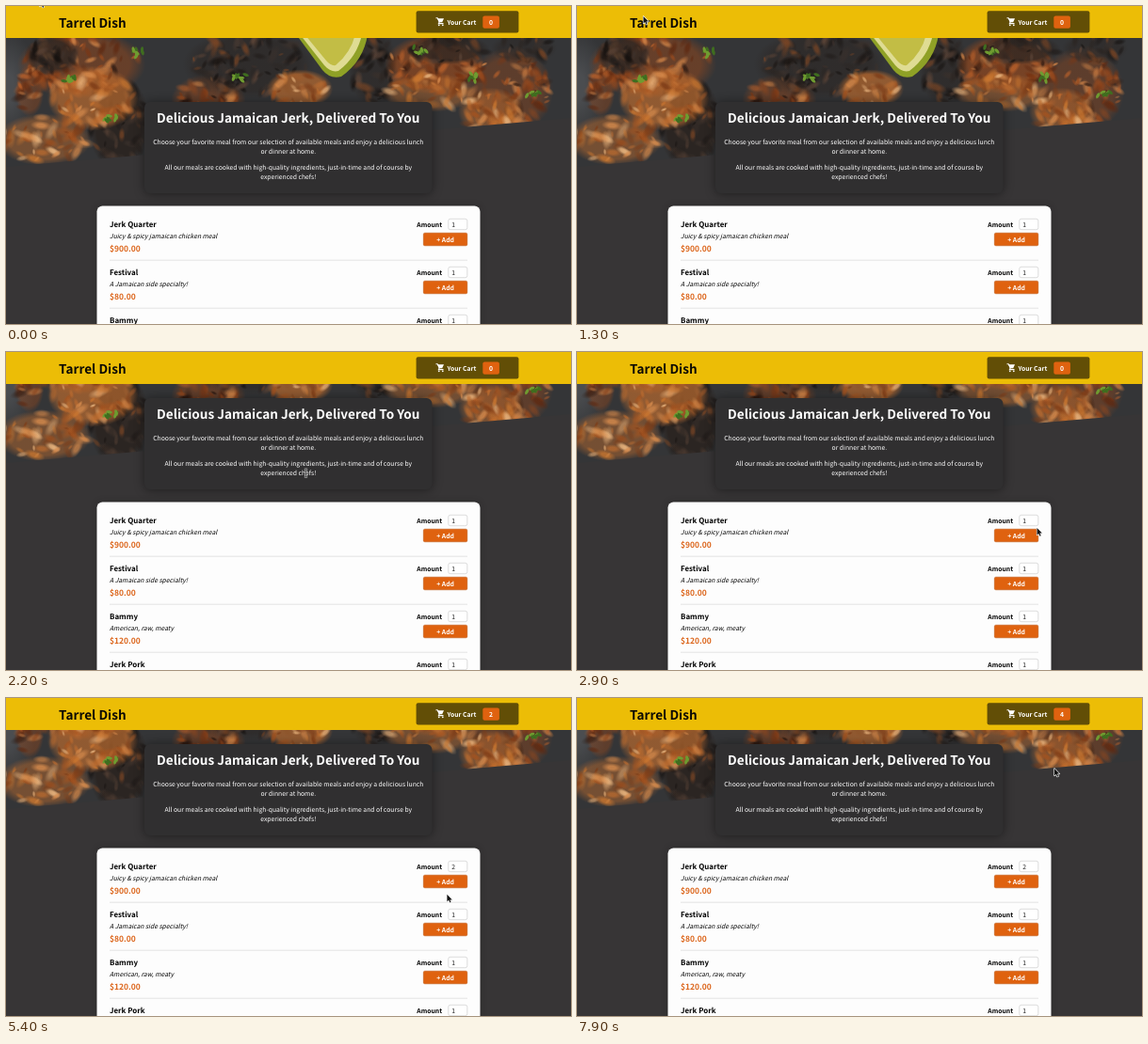
These frames come from a looping animation (600x338 px, 8000 ms). An HTML page with a canvas:

```html
<!DOCTYPE html>
<html lang="en">
<head>
<meta charset="utf-8">
<title>Food order</title>
<style>
html, body { margin: 0; width: 100%; height: 100%; overflow: hidden; background: #373536; }
canvas { display: block; }
</style>
</head>
<body>
<canvas id="stage" width="600" height="338"></canvas>
<script>
const ctx = document.getElementById('stage').getContext('2d');
const FAMILY = '"Noto Sans CJK JP", "Noto Sans CJK SC", "Noto Sans CJK", "Open Sans", sans-serif';
const LOOP = 8000, REM = 6.784, ORANGE = '#df620f', GOLD = '#ecbd06', PAGE = '#373536';

const meals = [
  ['Jerk Quarter', 'Juicy & spicy jamaican chicken meal', '$900.00'],
  ['Festival', 'A Jamaican side specialty!', '$80.00'],
  ['Bammy', 'American, raw, meaty', '$120.00'],
  ['Jerk Pork', '', '']
];
// Clicks on the add buttons: time, cart total afterwards
const clicks = [[4950, 2], [6400, 3], [7200, 4]];
const SPIN_CLICK = 3900;
// Pointer path: time, x, y
const path = [
  [0, 36, -7], [1300, 70.5, 11], [1500, 78, 18], [1900, 198, 125], [2350, 360, 130],
  [2850, 488.5, 187], [3050, 488.5, 187], [3400, 484.5, 176], [4400, 484.5, 176],
  [4800, 468, 195], [5200, 468, 195], [5800, 469.5, 248], [6600, 469.5, 248],
  [7000, 469, 298], [7300, 469, 298], [7800, 507, 75], [LOOP, 507, 75]
];

const clamp = v => Math.max(0, Math.min(1, v));
const smooth = v => { v = clamp(v); return v * v * (3 - 2 * v); };

function track(keys, t, ease = smooth) {
  let i = 1;
  while (i < keys.length - 1 && keys[i][0] < t) i++;
  const a = keys[i - 1], b = keys[i], u = ease((t - a[0]) / (b[0] - a[0]));
  return a.slice(1).map((v, n) => v + (b[n + 1] - v) * u);
}

function box(c, x, y, w, h, r, fill, stroke) {
  c.beginPath();
  c.roundRect(x, y, w, h, r);
  if (fill) { c.fillStyle = fill; c.fill(); }
  if (stroke) { c.strokeStyle = stroke; c.lineWidth = 0.5; c.stroke(); }
}

function text(str, x, y, rem, style, color, align = 'left') {
  const k = REM / 16;
  ctx.save();
  ctx.translate(x, y);
  ctx.scale(k, k);
  ctx.font = `${style} ${rem * 16}px ${FAMILY}`;
  ctx.textRendering = 'geometricPrecision';
  ctx.textAlign = align;
  ctx.fillStyle = color;
  ctx.fillText(str, 0, 0);
  ctx.restore();
}

// Impression of grilled chicken on slate
function makePhoto() {
  const cv = document.createElement('canvas');
  cv.width = 600; cv.height = 180;
  const c = cv.getContext('2d');
  let seed = 11;
  const rnd = () => (seed = seed * 16807 % 2147483647) / 2147483647;
  const blob = (color, x, y, rx, ry, core = 0.6, angle = 0) => {
    c.save();
    c.translate(x, y);
    c.rotate(angle);
    c.scale(rx, ry);
    const g = c.createRadialGradient(0, 0, 0, 0, 0, 1);
    g.addColorStop(0, color);
    g.addColorStop(core, color);
    g.addColorStop(1, color + '00');
    c.fillStyle = g;
    c.fillRect(-1, -1, 2, 2);
    c.restore();
  };
  const shape = (color, d) => { c.fillStyle = color; c.fill(new Path2D(d)); };

  c.fillStyle = '#343537';
  c.fillRect(0, 0, 600, 180);
  blob('#4b4d50', 2, 85, 30, 60, 0.2);

  const char = ['#2b2522', '#14100e', '#3a302b', '#1f1a18', '#5a4336', '#7a4524'];
  const rust = ['#97491d', '#5e2810', '#b9602a', '#2a1710', '#cf8347', '#7a3614'];
  const gold = ['#bd6c2f', '#d98d4e', '#a5531f', '#e6b27c', '#7d3c17', '#c9762f'];
  // Areas of meat: x, y, half width, half height, tones
  const areas = [
    [120, 125, 30, 45, char], [80, 62, 62, 32, rust], [48, 52, 26, 18, char],
    [92, 98, 44, 30, gold], [40, 142, 46, 24, gold], [25, 90, 14, 24, rust],
    [215, 100, 36, 24, rust], [258, 62, 64, 32, char], [312, 88, 32, 18, gold],
    [390, 66, 24, 36, char], [455, 62, 48, 28, rust], [470, 46, 40, 14, char],
    [450, 92, 46, 18, gold], [535, 90, 42, 40, rust], [515, 112, 32, 22, gold],
    [550, 45, 32, 14, char]
  ];
  for (const [x, y, w, h, tones] of areas) {
    blob(tones[0], x, y, w * 1.1, h * 1.15, 0.75);
    for (let i = 0; i < w * h / 22; i++) {
      const a = rnd() * 6.28, d = Math.sqrt(rnd()), size = 2 + rnd() * 6;
      c.globalAlpha = 0.4 + rnd() * 0.4;
      blob(tones[Math.floor(rnd() * 6)], x + Math.cos(a) * d * w, y + Math.sin(a) * d * h,
        size * 1.6, size * 0.7, 0.35, rnd() * 3);
    }
  }
  c.globalAlpha = 1;

  shape('#8fa126', 'M308 30H384Q380 58 356 75Q344 78 336 68Z');
  shape('#dfdc93', 'M312 30H378Q373 54 353 69Q345 71 338 63Z');
  shape('#c2bd45', 'M317 30H371Q366 50 350 63Q345 64 340 58Z');

  // Chopped herbs
  const herbs = [[68, 77], [142, 50], [248, 76], [440, 46], [496, 76], [560, 92], [112, 118]];
  for (const [x, y] of herbs)
    for (let i = 0; i < 8; i++)
      blob(i % 2 ? '#6f9b30' : '#3f6d1f', x + rnd() * 14 - 7, y + rnd() * 8 - 4, 4, 2, 0.6, rnd() * 3);
  return cv;
}
const photo = makePhoto();

function drawPhoto() {
  ctx.save();
  ctx.beginPath();
  ctx.moveTo(0, 0);
  ctx.lineTo(600, 0);
  ctx.lineTo(600, 119);
  ctx.lineTo(0, 171);
  ctx.clip();
  ctx.drawImage(photo, 0, 0);
  ctx.restore();
}

function drawSummary() {
  ctx.save();
  ctx.shadowColor = 'rgba(0,0,0,.45)';
  ctx.shadowBlur = 11;
  ctx.shadowOffsetY = 0.5;
  box(ctx, 147, 102, 305.5, 97, 6, '#302f30');
  ctx.restore();
  const line = (s, y) => text(s, 299.8, y, 1, '400', '#fff', 'center');
  text('Delicious Jamaican Jerk, Delivered To You', 299.8, 124.3, 2, '700', '#fff', 'center');
  line('Choose your favorite meal from our selection of available meals and enjoy a delicious lunch', 147.2);
  line('or dinner at home.', 157.2);
  line('All our meals are cooked with high-quality ingredients, just-in-time and of course by', 173.7);
  line('experienced chefs!', 183.7);
}

function drawMeal([name, info, price], i, t, hovered) {
  const y = 232 + 51 * i, first = i === 0;
  text(name, 110, y + 3.1, 1.17, '700', '#000');
  text(info, 110, y + 14.8, 1, 'italic 400', '#000');
  text(price, 110, y + 28.5, 1.25, '700', '#dc661c');
  text('Amount', 463, y + 2.7, 1, '700', '#000', 'right');

  const focus = first && t >= SPIN_CLICK && t < clicks[0][0];
  box(ctx, 469.8, y - 5.7, 20, 11.4, 2, '#fff', focus ? '#b99a84' : '#bbb');
  text(first && t >= SPIN_CLICK ? '2' : '1', 473.3, y + 2.7, 1, '400', '#222');
  if (focus && (t - SPIN_CLICK) % 1000 < 500) {
    ctx.fillStyle = '#222';
    ctx.fillRect(477.6, y - 4, 0.7, 8);
  }
  if (first && t > 3200 && t < 4560) {
    box(ctx, 482.5, y - 4.5, 6.5, 9, 1, '#d4d1ce');
    ctx.fillStyle = '#555';
    for (const s of [-1, 1]) {
      ctx.beginPath();
      ctx.moveTo(484.3, y + s * 1.3);
      ctx.lineTo(487.3, y + s * 1.3);
      ctx.lineTo(485.8, y + s * 3.2);
      ctx.fill();
    }
  }
  box(ctx, 443.3, y + 9.2, 46.5, 13.6, 1.5, hovered ? '#4f1605' : ORANGE, hovered ? '#4f1605' : '#b9500d');
  text('+ Add', 466.6, y + 18.8, 1, '700', '#fff', 'center');
  ctx.fillStyle = '#cfcfcf';
  ctx.fillRect(110, y + 37.8, 380, 0.6);
}

function drawHeader(t) {
  ctx.fillStyle = GOLD;
  ctx.fillRect(0, 0, 600, 34);
  text('Tarrel Dish', 56, 23, 2, '700', '#0c0a04');

  const last = clicks.filter(c => c[0] <= t).pop() || [-LOOP, 0];
  const bump = [[0, 1], [30, 0.9], [90, 1.1], [150, 1.15], [300, 1]];
  const [scale] = track(bump, t - last[0], clamp);
  ctx.save();
  ctx.translate(490, 16.8);
  ctx.scale(scale, scale);
  ctx.translate(-490, -16.8);
  box(ctx, 435.6, 5.2, 108.8, 23.2, 2, '#624e06');
  ctx.strokeStyle = ctx.fillStyle = '#fff';
  ctx.lineWidth = 1.1;
  ctx.beginPath();
  ctx.moveTo(456.5, 12.7);
  ctx.lineTo(458.2, 12.7);
  ctx.lineTo(460.2, 17);
  ctx.lineTo(459.4, 18.6);
  ctx.lineTo(464.5, 18.6);
  ctx.stroke();
  ctx.beginPath();
  ctx.moveTo(458.3, 13.3);
  ctx.lineTo(465, 13.3);
  ctx.lineTo(463.2, 17.2);
  ctx.lineTo(460, 17.2);
  ctx.fill();
  for (const x of [459.8, 463.8]) {
    ctx.beginPath();
    ctx.arc(x, 20.3, 0.9, 0, 7);
    ctx.fill();
  }
  text('Your Cart', 468.5, 19.6, 1, '700', '#fff');
  box(ctx, 506.3, 10.5, 17.6, 13.2, 2, ORANGE);
  text(last[1], 515.1, 19.6, 1, '700', '#fff', 'center');
  ctx.restore();
}

const shapes = {
  arrow: new Path2D('M0 0V7.6L1.8 6L3 8.7L4.2 8.2L3 5.6H5.4Z'),
  hand: new Path2D('M-.8 .7Q0-.4 .8 .7V3L3.5 3.7Q4.2 4 4 5.2L3.2 8H-1L-3 5Q-2.8 3.8-1.6 4.8L-.8 5.4Z'),
  beam: new Path2D('M-1.6-4H1.6M0-4V4M-1.6 4H1.6M-1 1H1')
};

function drawPointer(x, y, kind) {
  const shape = shapes[kind];
  const line = (color, width) => {
    ctx.strokeStyle = color;
    ctx.lineWidth = width;
    ctx.stroke(shape);
  };
  ctx.save();
  ctx.translate(x, y);
  ctx.lineJoin = 'round';
  line('#fff', kind === 'beam' ? 1.8 : 1.2);
  if (kind !== 'arrow') line('#222', 0.8);
  ctx.fillStyle = kind === 'hand' ? '#fff' : '#111';
  if (kind !== 'beam') ctx.fill(shape);
  ctx.restore();
}

function draw(t) {
  const scroll = 53 * smooth((t - 1700) / 500);
  const [x, y] = track(path, t);
  const over = meals.findIndex((m, i) => {
    const top = 241.4 + 51 * i - scroll;
    return x > 443 && x < 490 && y > top && y < top + 14;
  });

  ctx.fillStyle = PAGE;
  ctx.fillRect(0, 0, 600, 338);
  ctx.save();
  ctx.translate(0, -scroll);
  drawPhoto();
  drawSummary();
  ctx.save();
  ctx.shadowColor = 'rgba(0,0,0,.25)';
  ctx.shadowBlur = 7;
  box(ctx, 96.5, 212.5, 407, 240, 6, '#fdfdfd');
  ctx.restore();
  meals.forEach((meal, i) => drawMeal(meal, i, t, i === over));
  ctx.restore();
  drawHeader(t);

  const reading = x > 156 && x < 444 && t < 2600;
  drawPointer(x, y, over >= 0 ? 'hand' : reading ? 'beam' : 'arrow');
}

const start = performance.now();
function frame() {
  draw((performance.now() - start) % LOOP);
  requestAnimationFrame(frame);
}
frame();
</script>
</body>
</html>
```
